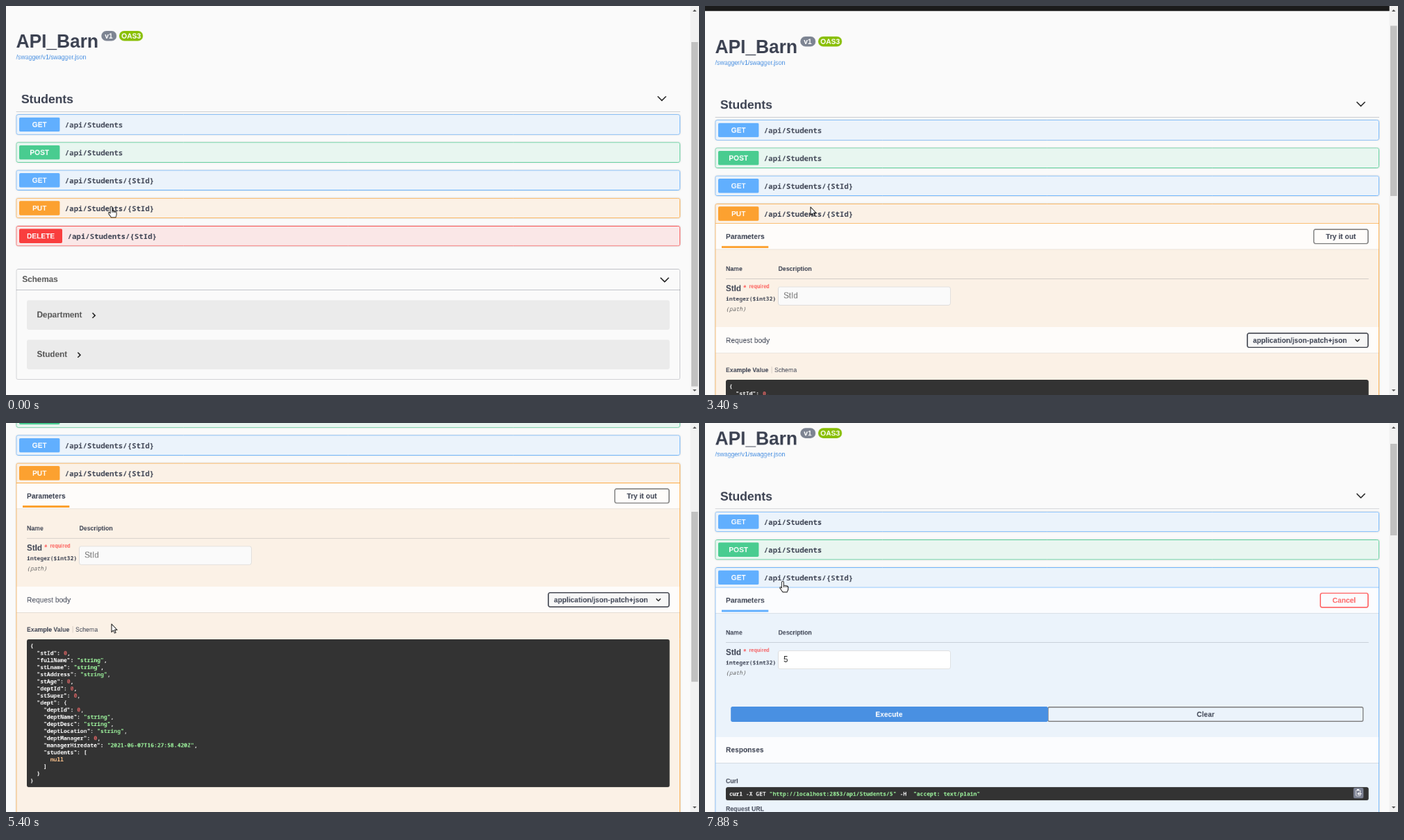
An HTML page with a canvas for the animation above (8000 ms loop, 998 by 561 pixels).

```html
<!DOCTYPE html>
<html lang="en">
<head>
<meta charset="utf-8">
<title>API documentation</title>
<style>
html, body { margin: 0; width: 100%; height: 100%; overflow: hidden; background: #fafafa; }
canvas { display: block; width: 998px; height: 561px; }
</style>
</head>
<body>
<canvas id="stage" width="1366" height="768"></canvas>
<script>
const canvas = document.getElementById('stage');
const ctx = canvas.getContext('2d');
const WIDTH = 998, HEIGHT = 561, LOOP = 8000, STEP = 40;
// The page is a 1366 px wide screen scaled down; PX is one of its pixels.
const PX = WIDTH / canvas.width;
const SANS = '"Liberation Sans", Arial, sans-serif';
const MONO = '"Noto Sans Mono", monospace';
const INK = '#3b4151', LINE = 'rgba(59,65,81,.3)';
const LEFT = 20 * PX, CONTENT = 1309 * PX, RIGHT = LEFT + CONTENT;
const ROWS_TOP = 275 * PX, ROW_PITCH = 55 * PX, ROW_HEIGHT = 40 * PX;
const SCHEMAS_TOP = 580 * PX, BASE_HEIGHT = 829 * PX;
const CODE_CHAR = 6.6 * PX;

const COLORS = {
  GET: ['#61affe', '#ebf3fb'],
  POST: ['#49cc90', '#e8f6f0'],
  PUT: ['#fca130', '#fbf1e6'],
  DELETE: ['#f93e3e', '#fae7e7']
};
const OPERATIONS = [
  ['GET', '/api/Students'],
  ['POST', '/api/Students'],
  ['GET', '/api/Students/{StId}'],
  ['PUT', '/api/Students/{StId}'],
  ['DELETE', '/api/Students/{StId}']
];
const EXAMPLE = `{
  "stId": 0,
  "fullName": "string",
  "stLname": "string",
  "stAddress": "string",
  "stAge": 0,
  "deptId": 0,
  "stSuper": 0,
  "dept": {
    "deptId": 0,
    "deptName": "string",
    "deptDesc": "string",
    "deptLocation": "string",
    "deptManager": 0,
    "managerHiredate": "2021-06-07T16:27:58.420Z",
    "students": [
      null
    ]
  }
}`.split('\n');
const CURL = 'curl -X GET "http://localhost:2853/api/Students/5" -H  "accept: text/plain"';

// Timelines: [time, value, ...], scroll in screen pixels, pointer in stage pixels
const SCROLL = [
  [0, 61], [1000, 61], [1040, 200],
  [3240, 200], [3280, 180], [3400, 50], [3440, 25], [3560, 0],
  [3680, 0], [3720, 12], [3800, 123], [3880, 267], [4000, 397], [4120, 400],
  [5360, 400], [5400, 361], [5440, 361], [5560, 240], [5680, 137], [5760, 105], [5840, 100]
];
const POINTER = [
  [0, 151.5, 289], [40, 151.5, 289], [80, 180, 246], [400, 180, 246], [520, 146.5, 282],
  [960, 146.5, 282], [1000, 152, 290], [5760, 152, 290], [6160, 132, 222],
  [6480, 120.5, 184], [6920, 112, 228], [7200, 112, 228], [7240, 107, 217],
  [7280, 107, 217], [7320, 112, 228]
];
const CARET_TOGGLES = [960, 3080, 3600, 4120, 4640, 5200, 5720, 6240, 6760, 7280];

function sample(keys, t) {
  const i = keys.findIndex(key => key[0] > t);
  if (i < 0) return keys[keys.length - 1].slice(1);
  const a = keys[i - 1], b = keys[i];
  const k = (t - a[0]) / (b[0] - a[0]);
  return a.slice(1).map((value, n) => value + (b[n + 1] - value) * k);
}

function panelAt(t) {
  if (t < 960) return { index: -1, extra: 0 };
  if (t < 2360) return { index: 3, extra: 169 * PX, draw: drawSpinner };
  if (t < 7880) return { index: 3, extra: 848 * PX, draw: drawPutPanel };
  return { index: 2, extra: 2284 * PX, draw: drawGetPanel };
}

const snap = value => Math.round(value / PX) * PX;

// Sizes are in screen pixels; y is the vertical centre of the capitals.
function text(str, x, y, size, { color = INK, weight = 'bold', align = 'left', font = SANS } = {}) {
  ctx.font = `${weight} ${size * PX}px ${font}`;
  ctx.fillStyle = color;
  ctx.textAlign = align;
  ctx.fillText(str, x, snap(y + size * PX * 0.355));
}

// Borders lie inside the box, like CSS borders.
function box(x, y, w, h, { fill, stroke, r = 0, border = 1 }) {
  const x1 = snap(x), y1 = snap(y), x2 = snap(x + w), y2 = snap(y + h);
  const inset = stroke ? border * PX / 2 : 0;
  ctx.beginPath();
  ctx.roundRect(x1 + inset, y1 + inset, x2 - x1 - 2 * inset, y2 - y1 - 2 * inset, r);
  if (fill) { ctx.fillStyle = fill; ctx.fill(); }
  if (stroke) { ctx.strokeStyle = stroke; ctx.lineWidth = border * PX; ctx.stroke(); }
}

function lines(points, color, width) {
  ctx.beginPath();
  points.forEach(([x, y]) => ctx.lineTo(x, y));
  ctx.strokeStyle = color;
  ctx.lineWidth = width;
  ctx.stroke();
}

const rule = (x1, x2, y, color = LINE) => box(x1, y, x2 - x1, PX, { fill: color });
const bar = (x, y, h, color) => box(x, y, PX, h, { fill: color });
const chevronDown = (x, y, w, h, width = 1.5) =>
  lines([[x - w, y - h], [x, y + h], [x + w, y - h]], '#111', width);
const chevronRight = (x, y) => lines([[x - 2, y - 3.6], [x + 1.8, y], [x - 2, y + 3.6]], '#111', 1.4);

function at(y, draw) {
  ctx.save();
  ctx.translate(0, snap(y));
  draw();
  ctx.restore();
}

function code(str, x, y) {
  let column = 0;
  for (const part of str.split(/((?<=\s)"[^"]*"(?!:)|\b0\b|null)/)) {
    const color = part === '0' ? '#d36363' : part === 'null' ? '#fcc28c'
      : /^"[^"]*"$/.test(part) ? '#a2fca2' : '#fff';
    text(part, x + column * CODE_CHAR, y, 11, { color, font: MONO });
    column += part.length;
  }
}

function band(y) {
  box(LEFT + PX, y, CONTENT - 2 * PX, 37, { fill: 'rgba(255,255,255,.8)' });
  rule(LEFT + PX, RIGHT - PX, y + 37, 'rgba(0,0,0,.1)');
}

function button(label, x, y, w, h, color, stroke) {
  box(x, y, w, h, { stroke, r: 2.5, border: 2 });
  text(label, x + w / 2, y + h / 2, 14, { color, align: 'center' });
}

function drawSpinner() {
  ctx.beginPath();
  ctx.arc(493, 75.7, 8.3, 0, Math.PI * 1.5);
  ctx.strokeStyle = '#555';
  ctx.lineWidth = 3 * PX;
  ctx.stroke();
}

function drawParameters(accent, value) {
  band(29);
  text('Parameters', 30, 47.5, 14);
  box(24, 61.3, 67.3, 3, { fill: accent });
  text('Name', 30, 94, 12);
  text('Description', 105.5, 94, 12);
  rule(30, 955.5, 108.3, 'rgba(59,65,81,.25)');
  text('StId', 30, 122.3, 16);
  text('*', 55.3, 121, 14, { color: 'rgba(255,0,0,.6)' });
  text('required', 63.5, 119.7, 10, { color: 'rgba(255,0,0,.6)' });
  text('integer($int32)', 30, 137.7, 11, { font: MONO });
  text('(path)', 30, 152, 11, { weight: 'italic 500', font: MONO, color: '#666' });
  box(105.2, 119.7, 248.4, 26.8, { fill: value ? '#fff' : '#fafafa', stroke: '#d9d9d9', r: 2.5 });
  text(value || 'StId', 113, 132.8, 16, { weight: 'normal', color: value ? '#222' : '#757575' });
}

function drawPutPanel() {
  drawParameters(COLORS.PUT[0]);
  button('Try it out', 875.9, 36.5, 79.6, 22, INK, '#808080');
  band(178.5);
  text('Request body', 30, 197.2, 14, { weight: 'normal' });
  box(780, 186.2, 175.5, 22, { fill: '#f7f7f7', stroke: '#41444e', r: 2.5, border: 2 });
  text('application/json-patch+json', 789, 197, 14);
  chevronDown(939.5, 197.2, 3.2, 1.7, 1.3);
  text('Example Value', 30, 240, 12);
  bar(95.4, 235, 10, 'rgba(0,0,0,.2)');
  text('Schema', 100, 240, 12, { weight: 'normal' });
  box(30, 254.4, 925.5, 213, { fill: '#333', r: 3 });
  EXAMPLE.forEach((line, i) => code(line, 34.8, 263.9 + i * 14 * PX));
  band(511.5);
  text('Responses', 30, 529.3, 14);
}

function drawGetPanel() {
  drawParameters(COLORS.GET[0], '5');
  button('Cancel', 885.3, 36.5, 70.2, 22, '#ff6060', '#ff6060');
  box(493.5, 200.8, 455, 22, { stroke: '#808080', r: 2, border: 2 });
  text('Clear', 721, 212, 14, { align: 'center' });
  box(37, 200.8, 457, 22, { fill: '#4990e2', r: 2.5 });
  text('Execute', 265, 212, 14, { color: '#fff', align: 'center' });
  band(244.7);
  text('Responses', 30, 263, 14);
  text('Curl', 30, 308, 12);
  box(30, 317, 925.5, 18.8, { fill: '#333', r: 3 });
  code(CURL, 34.8, 326.3);
  box(933.5, 318, 14.8, 15, { fill: '#7d8293', r: 2.5 });
  box(937, 321, 7, 9, { stroke: '#fff', r: 1 });
  box(939, 320, 3, 2, { fill: '#fff' });
  lines([[946, 326.5], [940, 326.5], [942, 324.5], [940, 326.5], [942, 328.5]], '#fff', 1);
  text('Request URL', 30, 348, 12);
}

function drawOperation([method, path], height, drawPanel, caret) {
  const [accent, tint] = COLORS[method];
  ctx.shadowColor = 'rgba(0,0,0,.19)';
  ctx.shadowBlur = 3;
  box(LEFT, 0, CONTENT, height, { fill: tint, r: 3 });
  ctx.shadowColor = 'transparent';
  box(LEFT, 0, CONTENT, height, { stroke: accent, r: 3 });
  const badge = method === 'DELETE' ? 62.2 : 58.4;
  box(19, 4.3, badge, 20.6, { fill: accent, r: 2 });
  text(method, 19 + badge / 2, 14.6, 14, { color: '#fff', align: 'center' });
  text(path, 26.4 + badge, 15.3, 14.66, { font: MONO });
  if (drawPanel) {
    rule(LEFT, RIGHT, 28.5, accent);
    drawPanel();
  }
  if (caret) bar(148.2, 7.7, 13.9, '#222');
}

function drawHeader() {
  box(0, 0, 985.6, 43.8, { fill: '#1b1b1b' });
  text('API_Barn', 14.6, 94.9, 36);
  box(137, 80.6, 22, 14.6, { fill: '#7d8492', r: 7.3 });
  text('v1', 148, 87.8, 14, { color: '#fff', align: 'center' });
  box(163, 80.6, 34.3, 14.6, { fill: '#89bf04', r: 7.3 });
  text('OAS3', 180.2, 87.8, 14, { color: '#fff', align: 'center' });
  text('/swagger/v1/swagger.json', 14.6, 117.9, 12, { weight: 'normal', color: '#4990e2' });
  text('Students', 22, 178.9, 24);
  chevronDown(944.5, 177.9, 6, 3);
  rule(LEFT, RIGHT, 196.7);
}

function drawSchemas() {
  box(LEFT, 0, CONTENT, 160, { stroke: LINE, r: 3 });
  text('Schemas', 23.4, 15, 16, { color: '#555' });
  chevronDown(948.5, 15.7, 6, 3);
  rule(LEFT, RIGHT, 30);
  [['Department', 126.5], ['Student', 105.3]].forEach(([name, arrowX], i) => {
    const y = 45.5 + i * 57;
    box(30, y, 925.5, 42, { fill: '#ebebeb', r: 3 });
    text(name, 44.6, y + 20.8, 16, { color: '#505050' });
    chevronRight(arrowX, y + 21.7);
  });
}

function drawScrollbar(scroll, pageHeight) {
  const top = 17 * PX, track = HEIGHT - 2 * top;
  box(WIDTH - top, 0, top, HEIGHT, { fill: '#f1f1f1' });
  box(987, top + scroll / pageHeight * track, 9.5, HEIGHT / pageHeight * track, { fill: '#c1c1c1' });
  ctx.fillStyle = '#505050';
  ctx.fill(new Path2D('M989 8l2.7-3 2.7 3zM989 553l2.7 3 2.7-3z'));
}

const ARROW = new Path2D('M0 0V11.5L2.6 9.1 4.4 13.2 6.2 12.4 4.5 8.4H8Z');
const HAND = new Path2D('M-1.4 10V1.6a1.4 1.4 0 0 1 2.8 0V6l4.6 1q1.7.4 1.7 2v3.2L6.3 16H0L-4 10.2q-.4-1.9 1.3-1.5Z');
const FINGERS = new Path2D('M1.4 6V9M3.6 6.8V9M5.6 7.2V9.2');

function drawPointer(x, y, isArrow) {
  ctx.save();
  ctx.translate(x, y);
  ctx.fillStyle = '#fff';
  ctx.strokeStyle = '#111';
  ctx.lineWidth = 0.9;
  ctx.lineJoin = 'round';
  ctx.fill(isArrow ? ARROW : HAND);
  ctx.stroke(isArrow ? ARROW : HAND);
  if (!isArrow) ctx.stroke(FINGERS);
  ctx.restore();
}

function render(t) {
  const scroll = sample(SCROLL, t)[0] * PX;
  const panel = panelAt(t);
  const caret = CARET_TOGGLES.filter(toggle => toggle <= t).length % 2 === 1;

  ctx.setTransform(1 / PX, 0, 0, 1 / PX, 0, 0);
  ctx.fillStyle = '#fafafa';
  ctx.fillRect(0, 0, WIDTH, HEIGHT + 1);
  at(-scroll, drawHeader);
  OPERATIONS.forEach((operation, i) => {
    const isOpen = i === panel.index;
    const shift = panel.index >= 0 && i > panel.index ? panel.extra : 0;
    at(ROWS_TOP + i * ROW_PITCH + shift - scroll, () => drawOperation(
      operation, ROW_HEIGHT + (isOpen ? panel.extra : 0), isOpen && panel.draw, caret && i === 3));
  });
  at(SCHEMAS_TOP + panel.extra - scroll, drawSchemas);
  drawScrollbar(scroll, BASE_HEIGHT + panel.extra);
  const [x, y] = sample(POINTER, t);
  drawPointer(x, y, t >= 1000 && t < 5840);
}

const start = performance.now();
function tick() {
  const elapsed = (performance.now() - start) % LOOP;
  render(Math.floor(elapsed / STEP) * STEP);
  requestAnimationFrame(tick);
}
tick();
</script>
</body>
</html>
```
